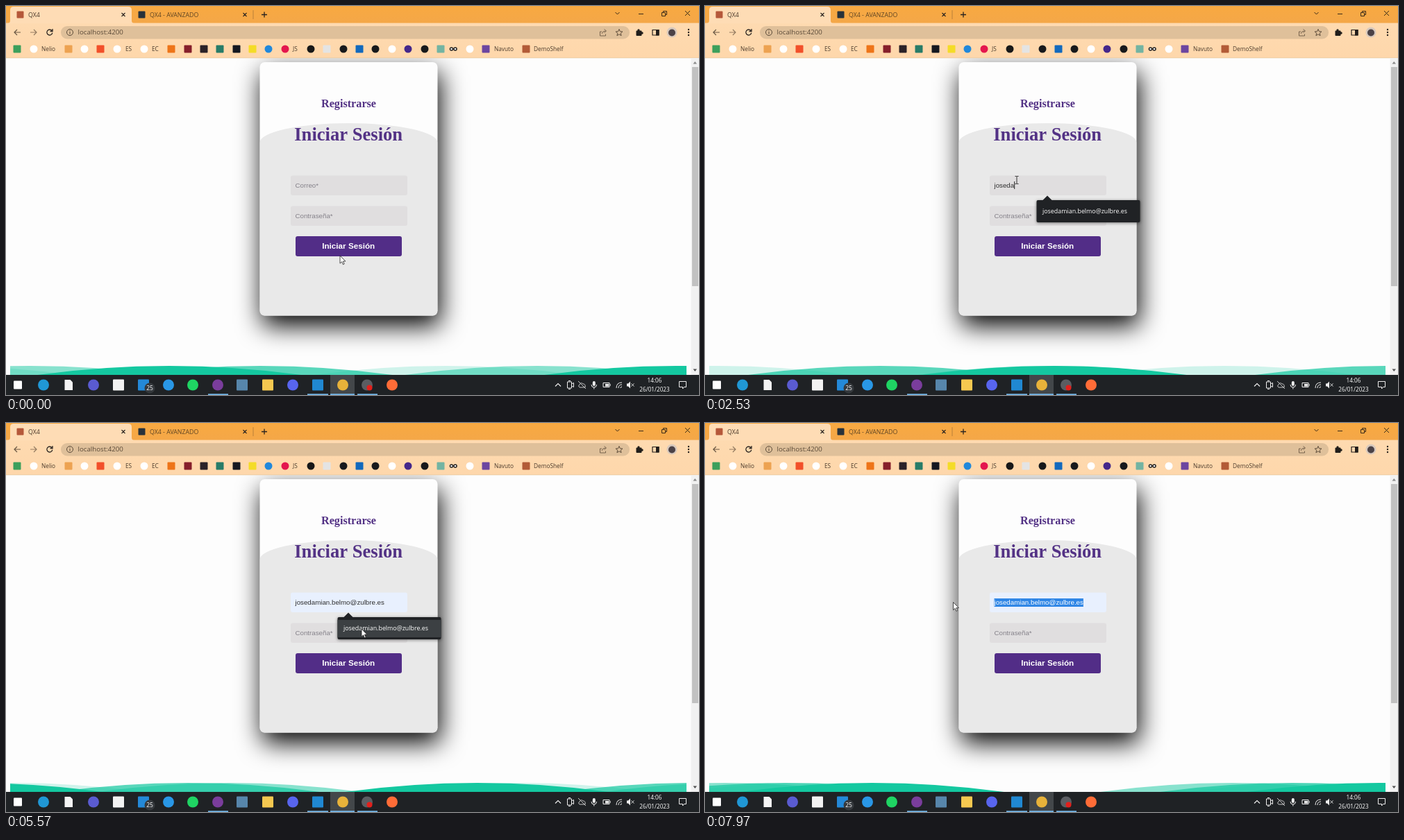
These frames come from a looping animation (998 by 561 pixels, 8000 ms). An HTML page with a canvas:

```html
<!DOCTYPE html>
<html lang="es">
<head>
<meta charset="utf-8">
<title>Iniciar Sesión</title>
<style>
  html, body { margin: 0; width: 100%; height: 100%; overflow: hidden; }
  canvas { display: block; width: 100vw; height: 100vh; }
</style>
</head>
<body>
<canvas id="stage" width="998" height="561"></canvas>
<script>
const ctx = document.getElementById('stage').getContext('2d');
const LOOP = 8000;
const UI = '"Open Sans", "Noto Sans", sans-serif';
const SANS = '"Liberation Sans", Arial, sans-serif';
const SERIF = '"Liberation Serif", "Times New Roman", serif';
const FIELD_FONT = '9.74px ' + SANS;

const EMAIL = 'josedamian.belmo@zulbre.es';
const SUGGESTIONS = [EMAIL, 'jdbelmocontreras@quelvia.es', 'pp@wqrt.es',
  'drpilulo@zorvo.com', 'kjk@w.es', 'wtnwt@zorvo.laprem'];

// Moments of the user's actions, in ms
const KEYS = [950, 1150, 1350, 1600, 2050, 2350, 2700, 3050, 4100];
const FOCUS = 550, PREVIEW = 5400, ACCEPT = 5650, SUBMIT = 6300, GRAB = 7350;
const MOUSE = [[0, 481, 360], [120, 481, 360], [480, 449, 251], [5100, 449, 251],
  [5380, 512, 297], [5700, 512, 297], [6150, 537, 359], [6750, 537, 359],
  [7250, 552, 259], [7400, 552, 259], [7850, 357.5, 258.5]];

// Icons: x, colour, shape (c = circle, s = square)
const BOOKMARKS = [[16, '#3c9f5c', 's'], [40, '#fff', 'c'], [90, '#eda251', 's'],
  [113, '#fff', 'c'], [136, '#f2502a', 's'], [160, '#fff', 'c'], [199, '#fff', 'c'],
  [238, '#ee7418', 's'], [262, '#861f2b', 's'], [285, '#2b2228', 's'], [308, '#287c68', 's'],
  [332, '#151820', 's'], [355, '#f4dc27', 's'], [378, '#2188db', 'c'], [402, '#e4164e', 'c'],
  [439, '#181818', 'c'], [462, '#e4e4e4', 's'], [486, '#17191c', 'c'], [509, '#1169bd', 's'],
  [532, '#17191c', 'c'], [556, '#fff', 'c'], [579, '#44278b', 'c'], [603, '#17191c', 'c'],
  [626, '#73b4a2', 's'], [668, '#fff', 'c'], [691, '#6c45a0', 's'], [749, '#b25b37', 's']];
const LABELS = [['Nelio', 51], ['ES', 172], ['EC', 210], ['JS', 413], ['Navuto', 703], ['DemoShelf', 760]];
const APPS = [[17, '#fff', 's'], [54, '#2097d4', 'c'], [126, '#5a5bd0', 'c'],
  [162, '#f2f2f2', 's'], [198, '#2489d8', 's'], [234, '#2997e6', 'c'], [269, '#1fd463', 'c'],
  [305, '#7a3d9c', 'c'], [340, '#5786ab', 's'], [377, '#f5c850', 's'], [413, '#5865ee', 'c'],
  [449, '#2088d2', 's'], [485, '#e8b23a', 'c'], [520, '#5b5d62', 'c'], [556, '#ff6c37', 'c']];

function box(x, y, w, h, color, radius = 0) {
  ctx.fillStyle = color;
  ctx.beginPath();
  ctx.roundRect(x, y, w, h, radius);
  ctx.fill();
}
function dot(x, y, r, color) {
  ctx.fillStyle = color;
  ctx.beginPath();
  ctx.arc(x, y, r, 0, 7);
  ctx.fill();
}
function icon([x, color, shape], y, size) {
  if (shape === 'c') dot(x, y, size / 2, color);
  else box(x - size / 2, y - size / 2, size, size, color, 1);
}
function text(str, x, y, font, color, align = 'left') {
  ctx.font = font;
  ctx.fillStyle = color;
  ctx.textAlign = align;
  ctx.fillText(str, x, y);
}
function stroke(d, color = '#2a2420', width = 1) {
  ctx.strokeStyle = color;
  ctx.lineWidth = width;
  ctx.stroke(new Path2D(d));
}
function fill(d, color) {
  ctx.fillStyle = color;
  ctx.fill(new Path2D(d));
}
function verticalFade(y0, y1, from, to) {
  const fade = ctx.createLinearGradient(0, y0, 0, y1);
  fade.addColorStop(0, from);
  fade.addColorStop(1, to);
  return fade;
}
const inside = (p, x, y, w, h) => p.x >= x && p.x <= x + w && p.y >= y && p.y <= y + h;

function mouseAt(t) {
  let i = 1;
  while (i < MOUSE.length - 1 && t > MOUSE[i][0]) i++;
  const [t0, x0, y0] = MOUSE[i - 1], [t1, x1, y1] = MOUSE[i];
  const k = Math.min(1, (t - t0) / (t1 - t0)), e = k * k * (3 - 2 * k);
  return { x: x0 + (x1 - x0) * e, y: y0 + (y1 - y0) * e };
}

// The same crest repeats every 730 px; four layers slide it at their own pace
function drawWave(turns, alpha) {
  const period = 730, half = 190, crest = 500;
  const first = crest + (turns - Math.floor(turns)) * period - 2 * period;
  ctx.globalAlpha = alpha;
  ctx.fillStyle = '#14c8a0';
  for (let c = first; c < 1200; c += period) {
    ctx.beginPath();
    ctx.moveTo(c - half, 532);
    ctx.quadraticCurveTo(c, 506, c + half, 532);
    ctx.fill();
  }
  ctx.globalAlpha = 1;
}
function drawWaves(t) {
  const elapsed = t + 5450;
  ctx.save();
  ctx.beginPath();
  ctx.rect(6, 519, 974, 13);
  ctx.clip();
  drawWave(elapsed / 4000, .5);
  drawWave(elapsed / 3000, .7);
  drawWave(-elapsed / 4000, 1);
  drawWave(-elapsed / 3000, .2);
  ctx.restore();
}

function drawCard() {
  ctx.save();
  ctx.shadowColor = '#000';
  ctx.shadowBlur = 36.5;
  ctx.shadowOffsetX = 3.6;
  ctx.shadowOffsetY = 14.6;
  box(365.5, 81, 256, 365.5, '#fdfdfd', 7);
  ctx.restore();
  ctx.save();
  ctx.beginPath();
  ctx.roundRect(365.5, 81, 256, 365.5, 7);
  ctx.clip();
  ctx.fillStyle = '#e9e9e9';
  ctx.beginPath();
  ctx.ellipse(493.5, 197, 128, 28, 0, Math.PI, 0);
  ctx.rect(365.5, 196.5, 256, 260);
  ctx.fill();
  ctx.restore();
  text('Registrarse', 493.5, 146, 'bold 16.2px ' + SERIF, '#533285', 'center');
  text('Iniciar Sesión', 493.2, 193.5, 'bold 26.6px ' + SERIF, '#533285', 'center');
}

function drawCaret(x, y, since) {
  if (since % 1000 < 500) box(x, y - 9, 1, 11, '#222');
}

function drawForm(t, mouse) {
  const filled = t >= PREVIEW;
  const typed = filled ? EMAIL : EMAIL.slice(0, KEYS.filter(k => k <= t).length);
  const hovered = t > ACCEPT && inside(mouse, 417, 332, 153, 28);

  box(410, 244.5, 168, 28.5, filled ? '#e8f0fe' : '#e0dedf', 3);
  box(410, 288.5, 168, 28.5, '#e0dedf', 3);
  box(417, 332, 153, 29, hovered ? '#6534ad' : '#522d87', 3);
  text('Iniciar Sesión', 493.2, 350, 'bold 11.7px ' + SANS, '#fff', 'center');
  text('Contraseña*', 416.5, 306, FIELD_FONT, '#85828a');
  text(typed || 'Correo*', 416.5, 262, FIELD_FONT, typed ? '#303030' : '#85828a');

  const emailFocused = t >= FOCUS && t < SUBMIT && !(t >= PREVIEW && t < ACCEPT);
  if (emailFocused) {
    const last = [FOCUS, ...KEYS, ACCEPT].filter(k => k <= t).pop();
    ctx.font = FIELD_FONT;
    drawCaret(416.5 + ctx.measureText(typed).width, 262, t - last);
  } else if (t >= SUBMIT && t < GRAB) {
    drawCaret(416.5, 306, t - SUBMIT);
  }
  if (t >= GRAB) drawSelection(mouse.x);
}

function drawSelection(mouseX) {
  ctx.font = FIELD_FONT;
  const edge = n => 416.5 + ctx.measureText(EMAIL.slice(0, n)).width;
  let start = 0;
  while (start < EMAIL.length && edge(start) < mouseX) start++;
  if (start === EMAIL.length) return;
  const left = edge(start), right = edge(EMAIL.length);
  box(left, 253, right - left, 12, '#2f86e6');
  text(EMAIL.slice(start), left, 262, FIELD_FONT, '#fff');
}

function drawSuggestions(t) {
  if (t < FOCUS + 50 || t >= ACCEPT) return;
  const items = t < KEYS[0] ? SUGGESTIONS : [EMAIL];
  const width = items.length > 1 ? 157.5 : 149;
  const height = items.length > 1 ? 163 : 32;
  ctx.save();
  ctx.shadowColor = 'rgba(0,0,0,.5)';
  ctx.shadowBlur = 4;
  ctx.shadowOffsetY = 1;
  box(477.5, 280, width, height, '#202225', 2);
  ctx.restore();
  fill('M486 280.5l7-7 7 7z', '#202225');
  if (t >= PREVIEW) box(477.5, 284, width, 25, '#3c4043');
  items.forEach((item, i) => text(item, 486, 299.3 + i * 26.3, '500 8.9px ' + UI, '#fff'));
}

function drawTooltip(t) {
  if (t < SUBMIT + 30 || t >= GRAB - 50) return;
  const bubble = 'M429 323h4l6-6 6 6h113q2 0 2 2v28q0 2-2 2H429q-2 0-2-2v-28q0-2 2-2z';
  ctx.save();
  ctx.shadowColor = 'rgba(0,0,0,.35)';
  ctx.shadowBlur = 4;
  ctx.shadowOffsetY = 1;
  fill(bubble, '#fafafa');
  ctx.restore();
  stroke(bubble, '#aaa3b5', .7);
  box(433, 330, 16.5, 16.5, '#f29b1d', 1);
  box(440.2, 332.5, 2.2, 7.5, '#fff');
  box(440.2, 342, 2.2, 2.2, '#fff');
  text('Completa este campo', 455.5, 342.7, '9.6px ' + UI, '#45404a');
}

function drawPointer(t, mouse) {
  const overList = t >= FOCUS + 50 && t < ACCEPT && inside(mouse, 477, 280, 149, 32);
  const overField = inside(mouse, 410, 244, 168, 29) || inside(mouse, 410, 288, 168, 29);
  ctx.save();
  ctx.translate(mouse.x, mouse.y);
  if (!overList && overField) {
    stroke('M-2.5-5.5h2l.5.5.5-.5h2M0-5V5M-2.5 5.5h2l.5-.5.5.5h2', '#333');
  } else if (!overList && inside(mouse, 417, 332, 153, 27.5)) {
    const hand = 'M-1.5 1q0-1.7 1.3-1.7T1 1v5.5l4.5 1q1.5.5 1.3 2.2l-.8 4.3-1 2.3h-6l-4-6q-.7-1.7 1-1.7l2.5 2z';
    fill(hand, '#fff');
    stroke(hand, '#222', .9);
  } else {
    const arrow = 'M0 0v11.2l2.6-2.4 1.8 4 1.8-.8-1.8-3.9h3.5z';
    fill(arrow, '#fff');
    stroke(arrow, '#222', .8);
  }
  ctx.restore();
}

function drawBrowser() {
  box(0, 0, 998, 25, verticalFade(0, 25, '#f8a941', '#f4a748'));
  box(0, 24.5, 998, 50.5, verticalFade(25, 75, '#fedab0', '#fed7ab'));
  fill('M2 25q4 0 4-4V6q0-5 5-5h165q5 0 5 5v15q0 4 4 4z', '#fedcb5');
  box(0, 74.5, 998, .8, '#e8c9a2');

  icon([20.5, '#b5583a', 's'], 12.5, 10);
  text('QX4', 32, 15.5, '8.8px ' + UI, '#4b3b2c');
  icon([195.5, '#28323a', 's'], 12.5, 10);
  text('QX4 - AVANZADO', 207, 15.5, '8.8px ' + UI, '#5f4524');
  stroke('M166.5 10l5 5m0-5l-5 5M341.5 10l5 5m0-5l-5 5', '#2a2420', 1.1);
  stroke('M356 6v13', '#b9803a');
  stroke('M368 12.5h8m-4-4v8', '#2a2420', 1.3);
  stroke('M877.5 9l3 3 3-3M911 11.5h7M944.5 9.5h5v5h-5zM946.5 9.5v-2h5v5h-2M978 7l7 7m0-7l-7 7', '#3a2a18');

  box(79, 29, 819, 18.5, '#dfc09a', 9);
  stroke('M21 38h-9m4-4l-4 4 4 4', '#6b5845', 1.2);
  stroke('M35 38h9m-4-4l4 4-4 4', '#937b61', 1.2);
  stroke('M66 35.5a4 4 0 1 0 .8 3.2M67 33v3.5h-3.5', '#2a2420', 1.3);
  stroke('M87.5 38a4.5 4.5 0 1 0 9 0a4.5 4.5 0 1 0-9 0M92 37v3.5M92 35v1', '#5b4a38');
  text('localhost:4200', 103.5, 41.3, '9.7px ' + UI, '#5b4a38');
  stroke('M858 37h-2.5v6h8v-2.5M858 40q1-4 5.5-4M861.5 33.5l3 2.5-3 2.5', '#6b5845', .9);
  stroke('M883 33.5l1.4 3.2 3.5.3-2.7 2.3.9 3.4-3.1-1.9-3.1 1.9.9-3.4-2.7-2.3 3.5-.3z', '#51402f', .9);
  box(907.5, 35.5, 8, 7.5, '#211d1a', 1);
  dot(911, 35, 1.7, '#211d1a');
  dot(916, 39, 1.7, '#211d1a');
  stroke('M931 34.5h9v7.5h-9z', '#211d1a', 1.2);
  box(936, 34, 4.5, 8.5, '#211d1a');
  dot(959, 38, 7.5, '#d8c9bd');
  dot(959, 38.5, 5, '#4b4247');
  [34, 38, 42].forEach(y => dot(983, y, 1.2, '#2a2420'));

  BOOKMARKS.forEach(b => icon(b, 62, 11));
  [641.5, 647].forEach(x => {
    dot(x, 62, 2.8, '#222');
    dot(x, 62, 1.3, '#fff');
  });
  LABELS.forEach(([label, x]) => text(label, x, 65, '8.3px ' + UI, '#4b3b2c'));

  box(986.5, 75.3, 11.5, 457, '#f1f1f1');
  box(988, 88, 9, 316, '#c1c1c1');
  fill('M989.5 83.5h5.5l-2.75-3.5z', '#8a8a8a');
  fill('M989.5 523.5h5.5l-2.75 3.5z', '#505050');
}

function drawTaskbar() {
  box(0, 532, 998, 29, '#1f2225');
  box(467, 532, 35, 29, '#43474a');
  APPS.forEach(a => icon(a, 546.5, a[0] === 17 ? 12 : 16));
  fill('M84.5 539h8l3.5 3.5v11.500h-11.500z', '#f4f4f4');
  dot(523.5, 550.5, 4, '#e2201c');
  dot(207, 551, 7.5, '#35393d');
  text('25', 207, 554.3, '8.5px ' + UI, '#fff', 'center');
  [[291, 29], [434, 30], [467, 35], [506, 29]].forEach(([x, w]) => box(x, 559.3, w, 1.7, '#76b9ed'));

  const white = '#eee';
  stroke('M791 548.5l4-4 4 4', white, 1.2);
  stroke('M808.5 542h6v9h-6zM814.5 545l3-1.5v6l-3-1.5M810 540.5h3M810 552.5h3', white);
  stroke('M826 550q-3-2 0-4 2-4 5-1 4 0 3 5zM824 541l11 11', '#c9c9c9');
  box(844.8, 541, 4, 7, white, 2);
  stroke('M843 546q0 4 3.8 4t3.8-4M846.8 550v2.5', white);
  stroke('M860 543.5h9v6h-9zM870 545v3', white);
  box(863, 545, 5, 3.5, white);
  stroke('M879 551q0-8 8-8M882 551q0-5 5-5M885 551q0-2 2-2', white);
  fill('M894 544.5h2l3-3v10l-3-3h-2z', white);
  stroke('M900.5 544.5l4 4m0-4l-4 4', white);
  text('14:06', 934, 542.5, '8.2px ' + UI, '#fff', 'center');
  text('26/01/2023', 934, 555.5, '8.2px ' + UI, '#fff', 'center');
  stroke('M969.5 541.5h10v8h-3l-2 2.5v-2.5h-5z', white);
}

function draw(now) {
  const t = now % LOOP;
  const mouse = mouseAt(t);
  box(0, 0, 998, 561, '#fdfdfd');
  drawCard();
  drawWaves(t);
  drawForm(t, mouse);
  drawSuggestions(t);
  drawTooltip(t);
  drawBrowser();
  drawTaskbar();
  drawPointer(t, mouse);
  requestAnimationFrame(draw);
}
requestAnimationFrame(draw);
</script>
</body>
</html>
```
